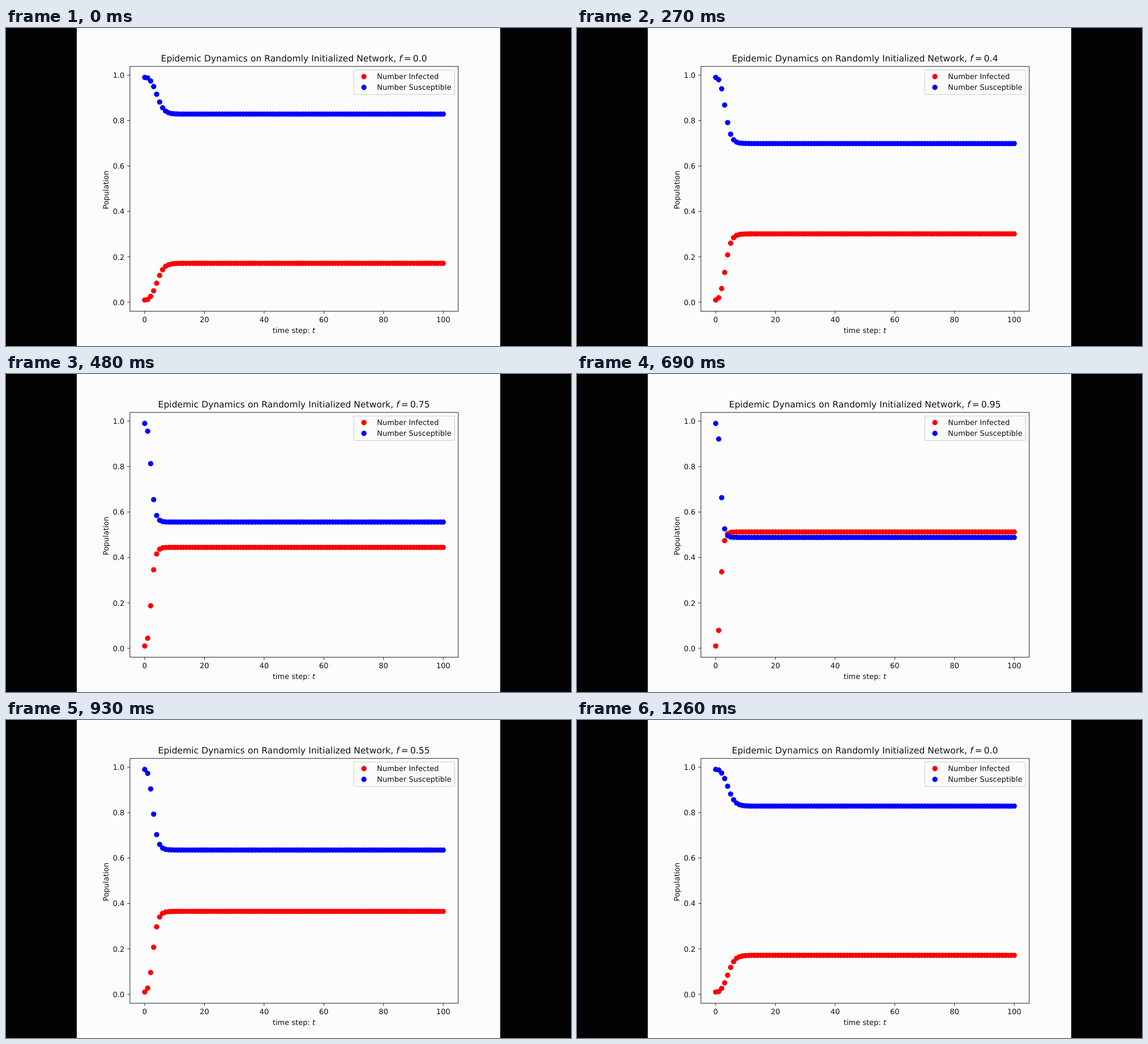
These frames come from a looping animation (998x561 px, 1290 ms). An HTML page:

```html
<!DOCTYPE html>
<html lang="en">
<head>
<meta charset="utf-8">
<title>Epidemic dynamics</title>
<style>
  html, body { margin: 0; width: 100%; height: 100%; overflow: hidden; background: #020202; }
  svg { display: block; width: 998px; height: 561px; }
  text { font: 12.99px "DejaVu Sans", sans-serif; text-rendering: geometricPrecision; fill: #111; }
  .mid { text-anchor: middle; }
  .end { text-anchor: end; }
  .it { font-style: italic; }
  #title { font-size: 15.58px; }
  .axis { fill: none; stroke: #222; }
  .dots { fill: none; stroke-width: 9.4; stroke-linecap: round; }
  .red { stroke: #f00; }
  .blue { stroke: #00f; }
</style>
</head>
<body>
<svg viewBox="0 0 998 561">
  <rect x="125" width="748" height="561" fill="#fcfcfc"/>
  <path id="infected" class="dots red"/>
  <path id="susceptible" class="dots blue"/>
  <g id="ticks"></g>
  <rect class="axis" x="218.9" y="67.8" width="579.9" height="431.9"/>
  <text id="title" class="mid" x="508.6" y="59.2">Epidemic Dynamics on Randomly Initialized Network, <tspan class="it">f</tspan><tspan dx="3.04">=</tspan><tspan id="fraction" dx="3.04">0.0</tspan></text>
  <text class="mid" x="508.5" y="538.4">time step: <tspan class="it">t</tspan></text>
  <text class="mid" transform="translate(180.8 285.6) rotate(-90)">Population</text>
  <rect x="614.3" y="74.2" width="178" height="43.2" rx="2.6" fill="#fcfcfc" fill-opacity=".8" stroke="#ccc" stroke-opacity=".8" stroke-width="1.3"/>
  <path class="dots red" d="M632.2 85.7h0"/>
  <path class="dots blue" d="M632.2 104.8h0"/>
  <text x="655.2" y="90">Number Infected</text>
  <text x="655.2" y="109">Number Susceptible</text>
</svg>
<script>
const $ = id => document.getElementById(id);
const px = t => 245 + 5.273 * t;
const py = v => 483.9 - 400.7 * v;

let marks = '';
for (let i = 0; i < 6; i++) {
  const x = px(20 * i), y = py(i / 5);
  marks += `<path class="axis" d="M${x} 499.7v4.55M218.9 ${y}h-4.55"/>
    <text class="mid" x="${x}" y="518.8">${20 * i}</text>
    <text class="end" x="209.4" y="${y + 4.8}">${(i / 5).toFixed(1)}</text>`;
}
$('ticks').innerHTML = marks;

// Logistic growth from 1% to a steady level: a slow first step, then a gently fading rate
function curve(f) {
  const steady = 0.1715 + f * (0.1305 + f * (0.7565 + f * (0.25 * f - 0.7813)));
  const first = 0.22 + 0.7 * f + 1.47 * f * f;
  const rate = 0.84 + 0.6 * f + 1.05 * f * f;
  let logit = Math.log(steady / 0.01 - 1);
  const share = [];
  for (let t = 0; t <= 100; t++) {
    share.push(steady / (1 + Math.exp(logit)));
    logit -= t ? rate * t ** (-0.35 * f) : first;
  }
  return share;
}

const dots = values => values.map((v, t) => `M${px(t).toFixed(2)} ${py(v).toFixed(2)}h0`).join('');

function draw(k) {
  const f = k / 20, share = curve(f);
  $('infected').setAttribute('d', dots(share));
  $('susceptible').setAttribute('d', dots(share.map(v => 1 - v)));
  $('fraction').textContent = f.toFixed(k % 2 ? 2 : 1);
}

// f climbs to 1 and falls back in 0.05 steps, resting one extra slot at each end
let shown = -1;
function tick() {
  const slot = Math.floor(performance.now() % 1290 / 30);
  const k = slot < 22 ? Math.max(0, slot - 1) : 42 - slot;
  if (k !== shown) draw(shown = k);
  requestAnimationFrame(tick);
}
tick();
</script>
</body>
</html>
```
